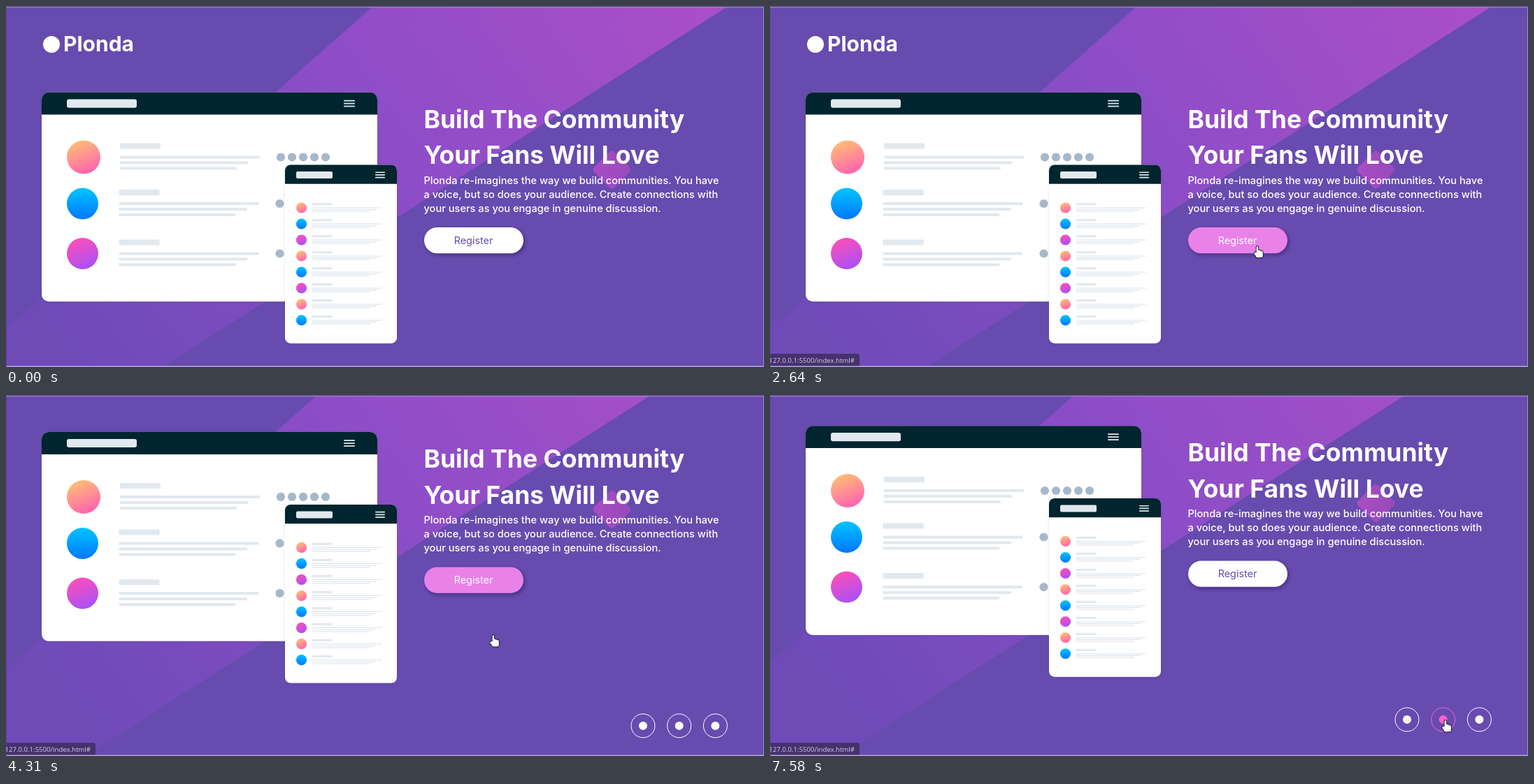
Animation of 1084x517 px, one loop 8 s. Source, as an HTML page with a canvas:

```html
<!DOCTYPE html>
<html lang="en">
<head>
<meta charset="utf-8">
<title>Landing page</title>
<style>
html, body { margin: 0; width: 100%; height: 100%; overflow: hidden; background: #674baf; }
canvas { display: block; }
</style>
</head>
<body>
<canvas id="stage" width="1084" height="517"></canvas>
<script>
const W = 1084, H = 517, LOOP = 8000, STEP = 70;
const ctx = document.getElementById('stage').getContext('2d');
const SANS = 'Inter, "Open Sans", sans-serif';
const BRAND = 'Plonda';
const VIOLET = [103, 75, 175], WHITE = [255, 255, 255];
const ORCHID = [232, 130, 232], PINK = [255, 96, 200];
const DARK = '#00252e', PALE = '#e1e8ee';
const AVATARS = [['#ffc074', '#ff5fb2'], ['#00c4ff', '#0078ff'], ['#ff4fb8', '#a650f8']];

// Pointer moves; power below 1 slows down, above 1 speeds up
const ENTRY = { x: 962, y: 518 };
const MOVES = [
  { start: 840, end: 1600, x: 769, y: 383, power: 1 },
  { start: 1670, end: 2440, x: 697, y: 344, power: 0.82 },
  { start: 4780, end: 5530, x: 857, y: 432, power: 1.56 },
  { start: 5590, end: 6020, x: 917, y: 465, power: 1 },
  { start: 7020, end: 7580, x: 966, y: 466, power: 0.8 }
];
const SCROLL = { start: 4170, end: 4380, distance: 79.5 };
const BURSTS = [...MOVES, SCROLL];

const ramp = (t, a, b) => Math.max(0, Math.min(1, (t - a) / (b - a)));
const smooth = p => p * p * (3 - 2 * p);
const easeOut = p => 1 - Math.pow(1 - p, 2.2);
const mix = (a, b, k) => `rgb(${a.map((v, i) => Math.round(v + (b[i] - v) * k))})`;
const hover = (t, on, off) => easeOut(ramp(t, on, on + 400)) * (1 - easeOut(ramp(t, off, off + 400)));

// Motion advances in steps counted from the start of each burst
function held(t) {
  const burst = BURSTS.find(b => t >= b.start && t <= b.end);
  if (!burst) return t;
  const steps = Math.floor((t - burst.start + 10) / STEP);
  return Math.min(burst.end, burst.start + steps * STEP);
}

function pointerAt(t) {
  let pos = ENTRY;
  for (const m of MOVES) {
    if (t < m.start) break;
    const p = Math.pow(ramp(t, m.start - STEP, m.end), m.power);
    const lift = 24 * p * (1 - p);
    pos = { x: pos.x + (m.x - pos.x) * p, y: pos.y + (m.y - pos.y) * p - lift };
  }
  return pos;
}

function rect(x, y, w, h, fill, r = 0) {
  ctx.fillStyle = fill;
  ctx.beginPath();
  ctx.roundRect(x, y, w, h, r);
  ctx.fill();
}

function disc(x, y, r, fill) {
  ctx.fillStyle = fill;
  ctx.beginPath();
  ctx.arc(x, y, r, 0, 7);
  ctx.fill();
}

function text(str, x, y, font, fill, align = 'left') {
  ctx.font = font;
  ctx.fillStyle = fill;
  ctx.textAlign = align;
  ctx.fillText(str, x, y);
}

function gradient(x0, y0, x1, y1, colors) {
  const g = ctx.createLinearGradient(x0, y0, x1, y1);
  colors.forEach((c, i) => g.addColorStop(i / (colors.length - 1), c));
  return g;
}

function raised(color, blur, x, y, paint) {
  ctx.save();
  ctx.shadowColor = color;
  ctx.shadowBlur = blur;
  ctx.shadowOffsetX = x;
  ctx.shadowOffsetY = y;
  paint();
  ctx.restore();
}

function avatar(x, y, r, kind) {
  const tilt = kind % 3 === 1 ? 0 : r * 0.4;
  disc(x, y, r, gradient(x - tilt, y - r, x + tilt, y + r, AVATARS[kind % 3]));
}

function panel(x, y, w, h, head, r) {
  raised('rgba(0,37,46,.12)', 4, 0, 1, () => rect(x, y, w, h, '#fff', r));
  rect(x, y, w, head, DARK, [r, r, 0, 0]);
}

function menu(x, y, w, gap) {
  for (let i = 0; i < 3; i++) rect(x, y + i * gap, w, gap * 0.45, PALE, 1);
}

// A title bar above three lines of shrinking length
function post(x, y, width, title, line, gap) {
  rect(x, y - gap * 2.25, width * 0.29, title, PALE, 1);
  for (let i = 0; i < 3; i++) rect(x, y + i * gap, width * (1 - 0.083 * i), line, PALE, 1);
}

function backdrop() {
  ctx.fillStyle = gradient(1030, 0, 190, 620, ['#ab4fc8', '#8c4dc7', '#6f4bb8']);
  ctx.fill(new Path2D('M525.3 0H1033L94 600H-155Z'));
  ctx.save();
  ctx.translate(866.5, 234.5);
  ctx.rotate(Math.PI / 4);
  rect(-20.5, -20.5, 41, 41, gradient(-20, 20, 20, -20, ['#a94dc2', '#984abb']), 5);
  ctx.restore();
}

function desktop() {
  panel(51, 123.7, 480, 299.5, 31.8, 10);
  rect(87, 133.5, 100, 12.2, PALE, 3);
  menu(483, 134.8, 16, 4);
  [216.5, 283, 354.5].forEach((y, i) => {
    const inset = i ? 1.5 : 0;
    avatar(111 - inset, y, 24 - inset, i);
    post(163 - inset, y - 2, 200, 8, 4, 8);
    for (let k = 0; k < 5; k++) disc(393 - inset + k * 16, y, 6.1, '#a7b8c9');
  });
}

function phone() {
  panel(399, 227.5, 160, 255.7, 27.3, 8);
  rect(415, 237, 52, 10, PALE, 2);
  menu(528, 237.4, 14, 3.7);
  for (let i = 0; i < 8; i++) {
    const y = 289 + i * 23;
    avatar(422.5, y, 7.6, i);
    post(437.5, y - 0.6, 100.5, 3, 1.3, 2.7);
  }
}

function copy() {
  const lines = (rows, y, gap, font) => rows.forEach((s, i) => text(s, 597.5, y + i * gap, font, '#fff'));
  disc(65, 55, 12, '#fff');
  text(BRAND, 82, 65, `700 30px ${SANS}`, '#fff');
  lines(['Build The Community', 'Your Fans Will Love'], 174.5, 51.7, `700 35.5px ${SANS}`);
  lines([
    BRAND + ' re-imagines the way we build communities. You have',
    'a voice, but so does your audience. Create connections with',
    'your users as you engage in genuine discussion.'
  ], 254.5, 20.2, `500 14.6px ${SANS}`);
}

function button(level) {
  raised('rgba(20,5,60,.42)', 6, 2, 2.5, () =>
    rect(598, 317, 142, 37.3, mix(WHITE, ORCHID, level), 18.6));
  text('Register', 668.5, 340.8, `400 14.4px ${SANS}`, mix(VIOLET, WHITE, level), 'center');
}

function social(levels) {
  levels.forEach((level, i) => {
    const x = 911 + i * 51.7, y = 544.3, color = mix(WHITE, PINK, level);
    ctx.strokeStyle = color;
    ctx.lineWidth = 1;
    ctx.beginPath();
    ctx.arc(x, y, 17, 0, 7);
    ctx.stroke();
    disc(x, y, 6, color);
  });
}

function statusBar(alpha) {
  ctx.globalAlpha = alpha;
  rect(-2, 498, 130, 21, '#46316d', [0, 3, 0, 0]);
  text('127.0.0.1:5500/index.html#', -1.5, 510.5, '400 9.6px "Open Sans", sans-serif', '#d6cde4');
  ctx.globalAlpha = 1;
}

function handShape() {
  const hand = new Path2D();
  for (let i = 0; i < 4; i++) hand.roundRect(-1.4 + i * 2.2, i && 4.8 + i * 0.7, 2.6, 9, 1.3);
  hand.roundRect(-4.6, 8.4, 4, 4.6, 1.8);
  hand.roundRect(-2.6, 8.5, 10.2, 7.8, 3);
  return hand;
}

const ARROW = new Path2D('M0 0V14.2L3.3 11.2L5.6 16.2L8 15.1L5.8 10.3H10.2Z');
const HAND = handShape();

function pointer({ x, y }, shape) {
  ctx.save();
  ctx.translate(x, y);
  ctx.lineJoin = 'round';
  ctx.lineWidth = 1.8;
  ctx.strokeStyle = '#17131f';
  ctx.fillStyle = '#fff';
  ctx.stroke(shape);
  ctx.fill(shape);
  ctx.restore();
}

function frameEdges() {
  rect(0, 0, W, 1, '#513a80');
  rect(0, 1, W, 1.3, '#a184ca');
  rect(0, 515.6, W, 1.4, '#b5a8d9');
  rect(0, 2, 0.8, H, '#5b4596');
  rect(1083, 2, 1, H, '#9f8dcb');
}

function draw(t) {
  const between = (a, b) => t >= a && t < b;
  rect(0, 0, W, H, mix(VIOLET, WHITE, 0));

  ctx.save();
  ctx.translate(0, -SCROLL.distance * smooth(ramp(t, SCROLL.start - 12, SCROLL.end - 30)));
  backdrop();
  desktop();
  phone();
  copy();
  button(hover(t, 2090, 4750));
  social([hover(t, 5800, 7090), hover(t, 7220, LOOP), 0]);
  ctx.restore();

  const status = ramp(t, 2470, 2620) - ramp(t, 5000, 5150) + ramp(t, 6110, 6220);
  if (status > 0) statusBar(status);
  frameEdges();

  if (t >= MOVES[0].start) {
    const linked = between(2110, 4770) || between(5800, 7085) || t >= 7235;
    pointer(pointerAt(t), linked ? HAND : ARROW);
  }
}

function tick(now) {
  draw(held(now % LOOP));
  requestAnimationFrame(tick);
}
requestAnimationFrame(tick);
</script>
</body>
</html>
```
